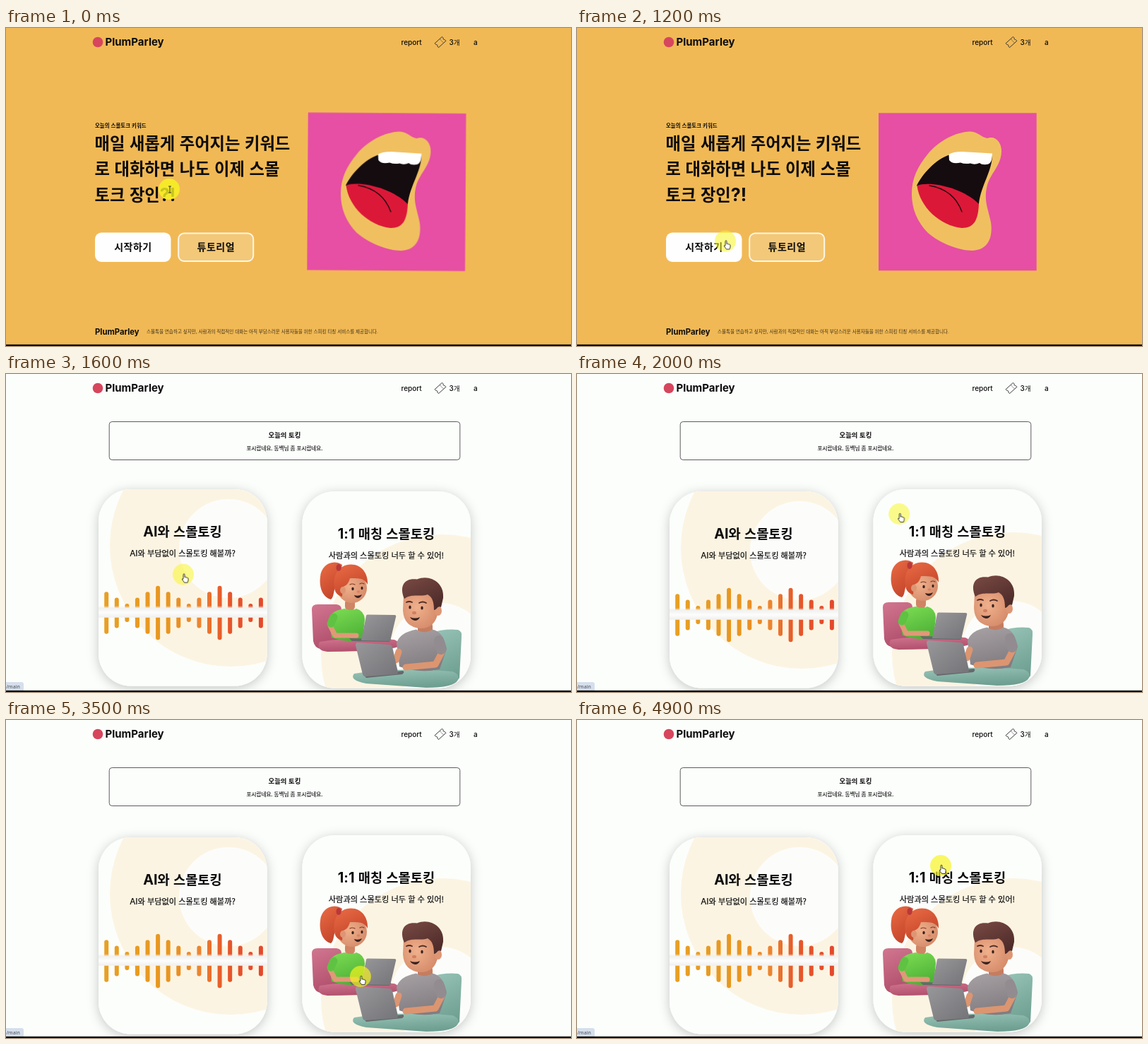
Animation, 800 px wide and 450 px high, one loop 5 s. Source, as an HTML page:

```html
<!DOCTYPE html>
<html lang="ko">
<head>
<meta charset="utf-8">
<title>PlumParley</title>
<style>
  html, body { margin: 0; width: 100%; height: 100%; overflow: hidden; background: #fcfefc; }
  svg { display: block; width: 100vw; height: 100vh; }
  text { font-family: "Noto Sans CJK KR", "Noto Sans CJK", sans-serif; fill: #0c0c0c; }
  .en { font-family: Inter, sans-serif; }
  .b { font-weight: 700; }
  .m { font-weight: 500; }
  .mid { text-anchor: middle; }
  .h1 { font-size: 23.3px; }
  .h2 { font-size: 18.7px; }
  .h2 .en { font-size: 19.8px; }
  .sub { font-size: 11.2px; stroke: #0c0c0c; stroke-width: .22px; }
  .sub .en { font-size: 11.8px; }
  .sub.early { font-size: 11.65px; }
  .quote { font-size: 7.55px; stroke: #0c0c0c; stroke-width: .14px; }
  .btn { font-size: 14px; letter-spacing: .5px; }

  .anim, .home, .main, .early, .ready, .ibeam, .arrow, .hand { animation: 5s linear infinite; }
  .home  { animation-name: home; animation-timing-function: step-end; }
  .main  { animation-name: main; animation-timing-function: step-end; }
  .early { animation-name: early; animation-timing-function: step-end; }
  .ready { animation-name: ready; animation-timing-function: step-end; }
  .ibeam { animation-name: ibeam; animation-timing-function: step-end; }
  .arrow { animation-name: arrow; animation-timing-function: step-end; }
  .hand  { animation-name: hand; animation-timing-function: step-end; }
  @keyframes home  { 0% { opacity: 1 } 25.9%, 100% { opacity: 0 } }
  @keyframes main  { 0% { opacity: 0 } 25.9%, 100% { opacity: 1 } }
  @keyframes early { 0% { opacity: 1 } 29.9%, 100% { opacity: 0 } }
  @keyframes ready { 0% { opacity: 0 } 29.9%, 100% { opacity: 1 } }
  @keyframes ibeam { 0% { opacity: 1 } 5.9%, 100% { opacity: 0 } }
  @keyframes arrow { 0% { opacity: 0 } 5.9% { opacity: 1 } 9.9% { opacity: 0 } 25.9% { opacity: 1 } 29.9%, 100% { opacity: 0 } }
  @keyframes hand  { 0% { opacity: 0 } 9.9% { opacity: 1 } 25.9% { opacity: 0 } 29.9%, 100% { opacity: 1 } }

  .sway { transform-origin: 539px 232px; animation-name: sway; animation-timing-function: ease-in-out; }
  @keyframes sway { 0% { transform: rotate(.38deg) } 18%, 100% { transform: none } }

  .card1 { animation-name: lift1; }
  .card2 { animation-name: lift2; }
  @keyframes lift1 { 0%, 30% { transform: none } 32%, 34.5% { transform: translateY(-3px) } 37%, 100% { transform: none } }
  @keyframes lift2 { 0%, 36.5% { transform: none } 39.5%, 100% { transform: translateY(-3px) } }

  .pointer { animation-name: travel; }
  @keyframes travel {
    0%   { transform: translate(231px, 228px) }
    2%   { transform: translate(230px, 231px) }
    6%   { transform: translate(224px, 255px) }
    10%  { transform: translate(213px, 290px) }
    13%  { transform: translate(210px, 299px) }
    18%  { transform: translate(210px, 300px) }
    26%, 30% { transform: translate(210px, 302px) }
    32%  { transform: translate(250px, 284px) }
    34%  { transform: translate(345px, 241px) }
    36%  { transform: translate(405px, 215px) }
    38%  { transform: translate(437px, 203px) }
    40%  { transform: translate(456px, 198px) }
    46%  { transform: translate(546px, 217px) }
    52%  { transform: translate(616px, 270px) }
    56%  { transform: translate(618px, 325px) }
    60%  { transform: translate(592px, 374px) }
    65%  { transform: translate(545px, 387px) }
    70%  { transform: translate(502px, 363px) }
    76%  { transform: translate(472px, 330px) }
    84%  { transform: translate(461px, 284px) }
    91%  { transform: translate(475px, 234px) }
    96%  { transform: translate(505px, 209px) }
    98%, 100% { transform: translate(515px, 206px) }
  }
  .halo { animation-name: glow; }
  @keyframes glow {
    0% { opacity: .8 } 18% { opacity: .62 } 26%, 40% { opacity: .52 }
    52%, 100% { opacity: .68 }
  }
</style>
</head>
<body>
<svg viewBox="0 0 800 450" preserveAspectRatio="none" xmlns="http://www.w3.org/2000/svg">
  <defs>
    <clipPath id="clip"><rect x="131" y="166" width="238.5" height="278.5" rx="46"/></clipPath>
    <clipPath id="clip2"><rect x="419.5" y="166" width="238.5" height="278.5" rx="46"/></clipPath>
    <filter id="shade" x="-20%" y="-20%" width="140%" height="140%">
      <feDropShadow dx="0" dy="3" stdDeviation="8" flood-color="#000" flood-opacity=".22"/>
    </filter>
    <linearGradient id="wave" gradientUnits="userSpaceOnUse" x1="139" y1="0" x2="364" y2="0">
      <stop offset="0" stop-color="#e8a024"/><stop offset=".4" stop-color="#e8961f"/>
      <stop offset=".6" stop-color="#ec8430"/><stop offset=".75" stop-color="#e6582a"/>
      <stop offset="1" stop-color="#e4482c"/>
    </linearGradient>
    <linearGradient id="band" x1="0" y1="0" x2="0" y2="1">
      <stop offset="0" stop-color="#f3f1ee" stop-opacity="0"/><stop offset=".2" stop-color="#f1f1ef"/>
      <stop offset=".55" stop-color="#fcfdfc"/><stop offset=".92" stop-color="#f1f0ee"/>
      <stop offset="1" stop-color="#f3f1ee" stop-opacity="0"/>
    </linearGradient>
    <radialGradient id="skin" cx=".4" cy=".45" r=".65">
      <stop offset="0" stop-color="#f0b08c"/><stop offset="1" stop-color="#d48a69"/>
    </radialGradient>
    <linearGradient id="red" x1="0" y1="0" x2=".5" y2="1">
      <stop offset="0" stop-color="#ea6c45"/><stop offset="1" stop-color="#c4452a"/>
    </linearGradient>
    <linearGradient id="brown" x1="0" y1="0" x2=".6" y2="1">
      <stop offset="0" stop-color="#7a4a44"/><stop offset="1" stop-color="#4e2c2a"/>
    </linearGradient>
    <linearGradient id="green" x1="0" y1="0" x2=".4" y2="1">
      <stop offset="0" stop-color="#7edd55"/><stop offset="1" stop-color="#4fb437"/>
    </linearGradient>
    <linearGradient id="gray" x1="0" y1="0" x2=".3" y2="1">
      <stop offset="0" stop-color="#a8a2a5"/><stop offset="1" stop-color="#827d81"/>
    </linearGradient>
    <linearGradient id="metal" x1="0" y1="0" x2="1" y2="1">
      <stop offset="0" stop-color="#98989b"/><stop offset="1" stop-color="#747478"/>
    </linearGradient>
    <linearGradient id="rose" x1="0" y1="0" x2=".3" y2="1">
      <stop offset="0" stop-color="#d27690"/><stop offset="1" stop-color="#b1506d"/>
    </linearGradient>
    <linearGradient id="teal" x1="0" y1="0" x2=".3" y2="1">
      <stop offset="0" stop-color="#98c4b7"/><stop offset="1" stop-color="#6fa092"/>
    </linearGradient>

    <g id="brand">
      <circle cx="130" cy="20" r="7.3" fill="#d6465d"/>
      <text class="en b" x="140.5" y="25.3" font-size="15">PlumParley</text>
    </g>
    <g id="account">
      <text class="en m" x="559.5" y="23.6" font-size="10">report</text>
      <g transform="translate(615 20) rotate(-42)" fill="none" stroke="#333" stroke-width=".9">
        <path d="M-7 -4H7V-1.5A1.6 1.6 0 0 0 7 1.5V4H-7V1.5A1.6 1.6 0 0 0 -7 -1.5Z"/>
        <path d="M2.5 -3.5V3.5" stroke-dasharray="1.3 1.2"/>
      </g>
      <text class="m" x="627.5" y="23.6" font-size="9.6"><tspan class="en" font-size="10">3</tspan>개</text>
      <text class="en m" x="662" y="23.6" font-size="10">a</text>
    </g>
  </defs>

  <g class="home">
    <rect width="800" height="450" fill="#f1b955"/>
    <use href="#brand"/>
    <use href="#account"/>
    <text class="b" x="126" y="141" font-size="7.45">오늘의 스몰토크 키워드</text>
    <g class="h1 b">
      <text x="125.5" y="171.6">매일 새롭게 주어지는 키워드</text>
      <text x="125.5" y="208.2">로 대화하면 나도 이제 스몰</text>
      <text x="125.5" y="244.8">토크 장인<tspan class="en" font-size="25">?!</tspan></text>
    </g>
    <rect x="126" y="289.5" width="107.5" height="41.5" rx="9" fill="#fefefe"/>
    <rect x="244.2" y="290.5" width="106" height="39.5" rx="8" fill="#f3c878" stroke="#fdf6e8" stroke-width="2"/>
    <text class="btn b mid" x="180" y="315.3">시작하기</text>
    <text class="btn b mid" x="297.3" y="315.3">튜토리얼</text>
    <g class="anim sway">
      <rect x="427" y="120.3" width="223.7" height="223" fill="#e64fa3"/>
      <path fill="#f0c060" d="M474 235C474 213 482 196 497 178C511 161 535 147 557 146.500C568 147 573 155 581 156C592 152 601 161 601 174C601 194 586 205 581 222C575 244 583 258 586 275C589 295 583 314 560 315C540 315 513 304 497 290C482 275 474 256 474 235Z"/>
      <path fill="#150c10" d="M481 223C490 206 506 187 528 179L588 179C588 203 572 222 569 249C560 262 540 262 520 250Z"/>
      <path fill="#fff" d="M526.500 179Q532 175 545 175L588 177.500Q588 193 580 193Q573 194 570 191Q563 194 557 191.500Q549 193 543 190.500Q531 193 527 187Z"/>
      <path fill="#dc1838" d="M481.500 223C500 216 546 226 569 249C568 272 562 283 545 283C514 280 485 253 481.500 223Z"/>
      <path fill="none" stroke="#250811" stroke-width="1.4" stroke-linecap="round" d="M499 223C523 227 538 241 545 260"/>
    </g>
    <text class="en b" x="126" y="433.6" font-size="11.3">PlumParley</text>
    <text x="199" y="432" font-size="6.54" fill-opacity=".78">스몰톡을 연습하고 싶지만, 사람과의 직접적인 대화는 아직 부담스러운 사용자들을 위한 스피킹 티칭 서비스를 제공합니다.</text>
  </g>

  <g class="main">
    <rect width="800" height="450" fill="#fcfefc"/>
    <use href="#brand"/>
    <text class="en m early" x="645.3" y="23.6" font-size="10">login</text>
    <use href="#account" class="ready"/>
    <rect x="146.2" y="67.5" width="496.6" height="54" rx="4" fill="none" stroke="#5c5c5c"/>
    <text class="b mid" x="394.5" y="90.3" font-size="9.4">오늘의 토킹</text>
    <text class="quote mid ready" x="394.5" y="107.8">포시랍네요. 동백님 좀 포시랍네요.</text>

    <g class="anim card1">
      <rect x="131" y="166" width="238.5" height="278.5" rx="46" fill="#fcfefc" filter="url(#shade)"/>
      <g class="ready" clip-path="url(#clip)">
        <circle cx="318" cy="246" r="171" fill="#fcf4e2"/>
        <circle cx="315" cy="250" r="70" fill="#fcfdfb"/>
        <g id="bars" stroke="url(#wave)" stroke-width="6" stroke-linecap="round"></g>
        <rect x="131" y="331" width="239" height="17.5" fill="url(#band)"/>
      </g>
      <text class="h2 b mid" x="250" y="233"><tspan class="en">AI</tspan>와 스몰토킹</text>
      <text class="sub mid early" x="250" y="260.4"><tspan class="en">AI</tspan>와 부담없이 스몰토킹 해볼까?</text>
      <text class="sub mid ready" x="250" y="260.6"><tspan class="en">AI</tspan>와 부담없이 스몰토킹 해볼까?</text>
    </g>

    <g class="anim card2">
      <rect x="419.5" y="166" width="238.5" height="278.5" rx="46" fill="#fcfefc" filter="url(#shade)"/>
      <g class="ready" clip-path="url(#clip2)">
        <g transform="translate(0 3)">
          <circle cx="617" cy="395" r="171" fill="#fcf4e2"/>
          <circle cx="614" cy="391" r="70" fill="#fcfdfb"/>

          <!-- girl -->
          <path fill="url(#rose)" d="M433 330Q433 323 441 323L468 323Q476 324 475 332L472 378L446 386Q437 385 435 375Z"/>
          <path fill="url(#rose)" d="M444 376Q495 368 550 373Q558 376 555 383Q540 389 455 390Q438 388 444 376Z"/>
          <path fill="url(#red)" d="M476 267C462 258 446 268 445 284C443 300 449 313 460 316C466 311 462 302 470 292Z"/>
          <rect x="480" y="315" width="14" height="17" rx="6" fill="#cf8464"/>
          <path fill="url(#green)" d="M457 344Q461 331 480 329Q489 333 496 329Q507 332 508 344L505 373Q484 378 461 370Z"/>
          <ellipse cx="490" cy="300" rx="21" ry="21" fill="url(#skin)"/>
          <path fill="url(#red)" d="M465 300C462 280 472 267 488 266.500C503 266 513 279 512 295C506 284 498 287 487 286C485 294 481 297 477 298L476 312C469 310 466 306 465 300Z"/>
          <ellipse cx="471" cy="271" rx="3.5" ry="5" fill="#b9383a"/>
          <ellipse cx="477" cy="303" rx="4" ry="5" fill="#dd9674"/>
          <g fill="#38221f">
            <ellipse cx="491" cy="301" rx="1.700" ry="2.300"/><ellipse cx="504" cy="300" rx="1.500" ry="2.300"/>
            <path d="M493 310Q499 312 504 309Q502 314 498 314Q494 313 493 310Z"/>
          </g>
          <ellipse cx="499" cy="305" rx="2.300" ry="1.700" fill="#d98462"/>
          <path fill="none" stroke="#7e3827" stroke-width="1.200" stroke-linecap="round" d="M487 295Q490 293 494 295M501 294Q504 292 507 294"/>
          <path fill="none" stroke="#df9a76" stroke-width="7" stroke-linecap="round" stroke-linejoin="round" d="M459 353L466 367L496 367"/>
          <path fill="none" stroke="#5fc242" stroke-width="11" stroke-linecap="round" d="M464 341L460 350"/>
          <path fill="#68686c" d="M486 371L545 372L543 376L490 375Z"/>
          <path fill="url(#metal)" d="M512 337.500L550 338Q553 338 552 341L544 375L503 374L510 339Q510 337.500 512 337.500Z"/>

          <!-- man -->
          <path fill="url(#teal)" d="M600 364Q620 357 640 359Q646 361 645 369L642 427Q637 435 608 435Z"/>
          <path fill="url(#teal)" d="M493 421Q550 412 632 418Q643 422 640 430Q634 441 595 441L510 435Q485 430 493 421Z"/>
          <rect x="583" y="346" width="21" height="22" rx="8" fill="#c57d60"/>
          <path fill="url(#gray)" d="M553 378Q557 363 581 358.500Q592 366 604 358.500Q620 362 624 386L614 415Q585 421 557 411Z"/>
          <path fill="url(#skin)" d="M563 310Q585 296 611 311L612 333Q608 357 587 357Q563 355 562 331Z"/>
          <ellipse cx="612" cy="332" rx="5" ry="7" fill="#dd9674"/>
          <path fill="url(#brown)" d="M564 315C556 296 565 285 582 287.500C600 280 621 292 619 314L616 327C611 324 610 331 606 331C606 320 604 313 597 309C588 313 575 307 564 315Z"/>
          <g fill="#38221f">
            <ellipse cx="572" cy="327" rx="1.700" ry="2.600"/><ellipse cx="589" cy="328" rx="1.700" ry="2.600"/>
            <path d="M572 341Q579 344 586 341Q584 346 579 346Q574 345 572 341Z"/>
          </g>
          <ellipse cx="578" cy="335" rx="3" ry="2.200" fill="#d27f5f"/>
          <path fill="none" stroke="#4c2c27" stroke-width="1.800" stroke-linecap="round" d="M567 320Q571 318 575 320M585 321Q590 318 595 321"/>
          <path fill="none" stroke="#dc9571" stroke-width="9" stroke-linecap="round" stroke-linejoin="round" d="M617 391L608 408L566 412M556 390L552 402"/>
          <path fill="none" stroke="#928c90" stroke-width="14" stroke-linecap="round" d="M613 374L616 387"/>
          <path fill="#68686c" d="M506 422L562 417Q565 419 561 422L510 427Z"/>
          <path fill="url(#metal)" d="M498 377L543 380Q546 380 547 383L555 419Q555 422 552 422L509 425Q506 425 505 422L495 381Q495 377 498 377Z"/>
        </g>
      </g>
      <text class="h2 b mid" x="538.5" y="232.8"><tspan class="en">1:1</tspan> 매칭 스몰토킹</text>
      <text class="sub mid early" x="538.5" y="260.4">사람과의 스몰토킹 너두 할 수 있어!</text>
      <text class="sub mid ready" x="538.5" y="260.8">사람과의 스몰토킹 너두 할 수 있어!</text>
    </g>
    <path fill="#d5dfec" d="M0 436H22Q25 436 25 439V448H0Z"/>
    <text x="0.5" y="445.3" font-size="7" style="font-family:'Noto Sans',sans-serif;fill:#4a4f58">/main</text>
  </g>

  <rect y="447.8" width="800" height="2.2" fill="#0b0b0b"/>

  <g class="anim pointer">
    <circle class="anim halo" r="15" fill="#f8f520"/>
    <path class="ibeam" fill="none" stroke="#333" stroke-width="1" d="M-1 -4H1M3 -4H1V5M-1 5H3"/>
    <path class="arrow" fill="#fff" stroke="#333" stroke-width=".9" stroke-linejoin="round" d="M0 0V9.500L2.200 7.600L3.700 11L5.200 10.300L3.700 7.100H6.500Z"/>
    <path class="hand" fill="#fff" stroke="#222" stroke-width=".9" stroke-linejoin="round" d="M0 0.500Q0 -.8 1 -.8Q2 -.8 2 .5V4Q3.500 3.200 4 4.300Q5.300 3.800 5.700 5Q7.200 4.700 7.200 6.300Q7.200 9.500 6 11.500H1.500Q0 9 -1.700 7.200Q-2.200 5.800 0 6.500Z"/>
  </g>
</svg>
<script>
  // Triangular waveform: every sixth bar is shortest.
  const bars = document.getElementById("bars");
  for (let i = 0; i < 16; i++) {
    const step = (i + 4) % 6;
    const half = 10 + 8.4 * Math.min(step, 6 - step);
    const line = document.createElementNS("http://www.w3.org/2000/svg", "path");
    const x = 142.2 + 14.58 * i;
    line.setAttribute("d", `M${x} ${341 - half}V${341 + half}`);
    bars.append(line);
  }
</script>
</body>
</html>
```
